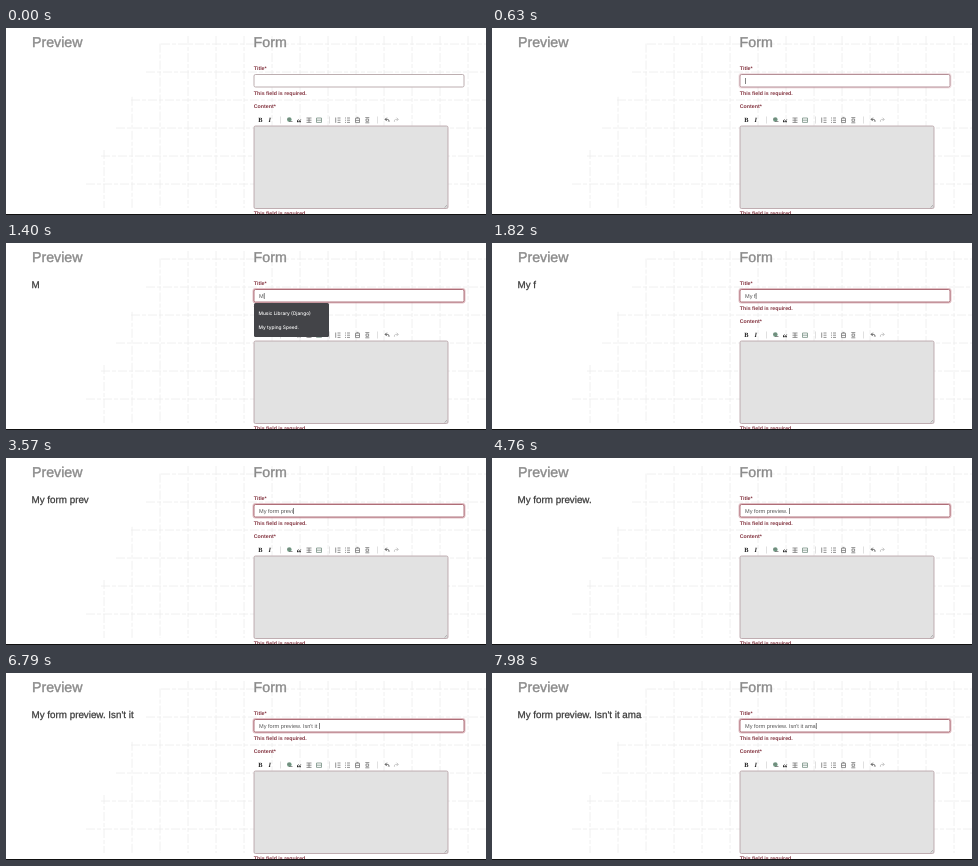
An HTML page that plays this animation: 480 px wide and 187 px high, repeating every 8 s.

```html
<!DOCTYPE html>
<html lang="en">
<head>
<meta charset="utf-8">
<title>Form with live preview</title>
<style>
  html, body { margin: 0; height: 100%; overflow: hidden; background: #fff; }
  svg { display: block; width: 100vw; height: 100vh; }
  text { font-family: "Liberation Sans", Arial, sans-serif; white-space: pre; text-rendering: geometricPrecision; }
  .heading { font-size: 14.2px; fill: #8b8b8b; stroke: #8b8b8b; stroke-width: .4; }
  .label { font-size: 5.28px; font-weight: bold; fill: #843541; }
  #preview { font-size: 9.8px; fill: #3a3a3a; stroke: #3a3a3a; stroke-width: .25; }
  #input { font-size: 5.6px; fill: #555; }
  #menu text { font: 500 4.82px Inter, sans-serif; fill: #fff; }
  #grid { fill: none; stroke: #ececec; stroke-width: .8; stroke-dasharray: 9 2 4 2; }
  .icon { fill: none; stroke: #777; stroke-width: .8; }
  .serif { font: bold 6.4px "Liberation Serif", serif; fill: #222; }
</style>
</head>
<body>
<svg viewBox="0 0 480 187" preserveAspectRatio="none">
  <path id="grid"/>
  <text class="heading" x="26" y="18.6">Preview</text>
  <text class="heading" x="247.6" y="18.6">Form</text>
  <text id="preview" x="25.6" y="45.4"></text>

  <text class="label" x="247.8" y="42.4">Title*</text>
  <rect id="glow" x="247.5" y="46" width="211" height="13.5" rx="2" fill="none" stroke="#c98c96" stroke-width="2"/>
  <rect id="field" x="248" y="46.5" width="210" height="12.5" rx="1.5" fill="#fff" stroke-width=".8"/>
  <text id="input" x="253" y="54.8"></text>
  <rect id="caret" y="50" width=".6" height="6" fill="#333"/>
  <text class="label" x="247.8" y="67">This field is required.</text>
  <text class="label" x="247.8" y="80.4">Content*</text>

  <text class="serif" x="252.2" y="94.3">B</text>
  <text class="serif" x="262.6" y="94.3" font-style="italic" style="font-style:italic">I</text>
  <path class="icon" style="stroke:#ccc;stroke-width:.6" d="M274.5 88.5v7M323.5 88.5v7M371.5 88.5v7"/>
  <circle cx="283.3" cy="91.6" r="2.3" fill="#6f9a83"/>
  <path class="icon" d="M283 93.5h3.5M281.5 91h3"/>
  <text class="serif" x="290.6" y="97.6" style="font-size:10px">“</text>
  <path class="icon" d="M300.5 90h5M300.5 92.2h5M300.5 94.4h5M303 90v4.5"/>
  <path class="icon" style="stroke:#789184" d="M310.5 90h5v4.4h-5zM310.5 92.2h5"/>
  <path class="icon" d="M331.5 90h3M331.5 92.2h3M331.5 94.4h3M329.7 89.5v5.3"/>
  <path class="icon" d="M341 90h3M341 92.2h3M341 94.4h3M339 90h1M339 92.2h1M339 94.4h1"/>
  <path class="icon" d="M349.5 90.2h4v4.4h-4zM350.5 89.4h2M349.5 92.4h4"/>
  <path class="icon" d="M359.3 89.6h4M359.3 94.8h4M360 91h2.6v2.3h-2.6z"/>
  <path class="icon" style="stroke:#444" d="M380.8 89.7l-1.7 1.7 1.7 1.7M379.2 91.4h2.6q1.6.3 1.2 2.4"/>
  <path class="icon" style="stroke:#bbb" d="M390.6 89.7l1.7 1.7-1.7 1.7M392.2 91.4h-2.6q-1.6.3-1.2 2.4"/>

  <rect x="248" y="98" width="194" height="82.5" rx="1.5" fill="#e2e2e2" stroke="#b39ca1" stroke-width=".8"/>
  <path d="M438.5 179.5l2.5-2.5M440 179.5l1-1" stroke="#888" stroke-width=".5"/>
  <text class="label" x="247.8" y="187.4">This field is required.</text>
  <g id="menu"></g>
  <rect y="186" width="480" height="1" fill="#111"/>
</svg>
<script>
const $ = id => document.getElementById(id);
const LOOP = 8000;
const TEXT = "My form preview. Isn't it ama";

// When each character is typed; the preview follows one tick later,
// except that punctuation waits for the next key.
const typed = [
  1400, 1610, 1680, 1750, 1960, 2030, 2170, 2380,
  2870, 2940, 3220, 3500, 3570, 3710, 3780, 3990, 4410,
  4970, 5320, 5600, 5880, 6090, 6160, 6510, 6720, 6790, 7210, 7700, 7910
];
const lag = { 0: 0, 15: 490, 20: 280 };
const shown = typed.map((time, i) => time + (lag[i] ?? 70));

const menus = [
  { from: 700, to: 1400, width: 154, items: [
    "ATM (One Time Transaction) In C",
    "Sports Betting System.",
    "Sports Betting System (Machine Learning)",
    "Novadrix Bruteforce Application",
    "Music Library (Django)",
    "Scientists turn undersea fiber optic cables into seismographs"
  ] },
  { from: 1400, to: 1610, width: 75, items: ["Music Library (Django)", "My typing Speed."] },
  { from: 1610, to: 1750, width: 75, items: ["My typing Speed."] }
];

const menuMarkup = ({ width, items }) =>
  `<rect x="248" y="60" width="${width}" height="${items.length * 14 + 6}" rx="1.5" fill="#434448"/>` +
  items.map((item, i) => `<text x="252.5" y="${71.7 + 14 * i}">${item}</text>`).join("");

let grid = "";
for (let i = 0; i < 6; i++) grid += `M${155 - 15 * i} ${16 + 28 * i}H480`;
for (let x = 98; x < 480; x += 28) grid += `M${x} ${Math.max(8, 122 - (x - 98) * 1.9)}V180`;
$("grid").setAttribute("d", grid);

const textAt = (times, t) => TEXT.slice(0, times.filter(time => time <= t).length);

let openMenu;
function draw(t) {
  const focus = Math.min(1, Math.max(0, (t - 560) / 150));
  const mix = (a, b) => a + (b - a) * focus;
  $("glow").setAttribute("opacity", focus * 0.55);
  $("field").setAttribute("stroke", `rgb(${mix(172, 158)},${mix(155, 82)},${mix(158, 94)})`);

  $("preview").textContent = textAt(shown, t);
  $("input").textContent = textAt(typed, t);
  $("caret").setAttribute("x", 253.2 + $("input").getComputedTextLength());
  $("caret").setAttribute("opacity", t < 560 || (t >= 1120 && t < 1400) ? 0 : 1);

  const menu = menus.find(({ from, to }) => t >= from && t < to);
  if (menu !== openMenu) $("menu").innerHTML = menu ? menuMarkup(menu) : "";
  openMenu = menu;
}

const start = performance.now();
function tick() {
  draw((performance.now() - start) % LOOP);
  requestAnimationFrame(tick);
}
tick();
</script>
</body>
</html>
```
